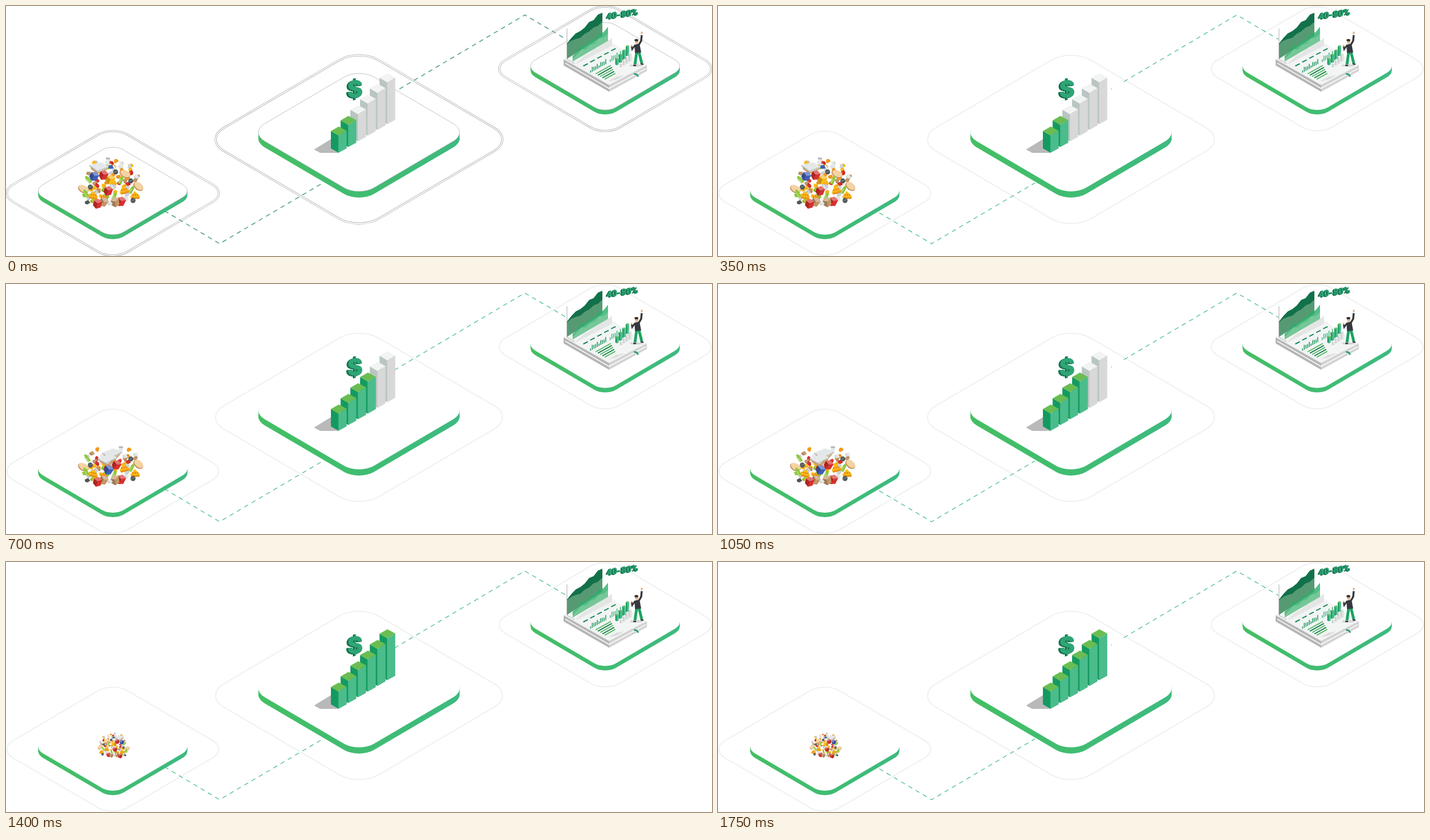
These frames come from a looping animation (1256x446 px, 2100 ms). An HTML page with a canvas:

```html
<!DOCTYPE html>
<html lang="en">
<head>
<meta charset="utf-8">
<style>
  html, body { margin: 0; width: 100%; height: 100%; overflow: hidden; background: #fff; }
  canvas { display: block; }
</style>
</head>
<body>
<canvas id="stage" width="1256" height="446"></canvas>
<script>
const ctx = document.getElementById('stage').getContext('2d');
const STEP = 350, STEPS = 6;

function trace(pts) {
  ctx.beginPath();
  for (let i = 0; i < pts.length; i += 2) ctx.lineTo(pts[i], pts[i + 1]);
}
function poly(color, ...pts) {
  trace(pts);
  ctx.fillStyle = color;
  ctx.fill();
}
function line(color, width, ...pts) {
  trace(pts);
  ctx.strokeStyle = color;
  ctx.lineWidth = width;
  ctx.stroke();
}
function oval(color, x, y, rx, ry = rx) {
  ctx.beginPath();
  ctx.ellipse(x, y, rx, ry, 0, 0, 7);
  ctx.fillStyle = color;
  ctx.fill();
}
function placed(x, y, draw, turn = 0) {
  ctx.save();
  ctx.translate(x, y);
  ctx.rotate(turn);
  draw();
  ctx.restore();
}

// Plates
function diamond(x, y, halfWidth, r) {
  const a = (halfWidth + 0.414 * r) / Math.SQRT2;
  ctx.beginPath();
  ctx.save();
  ctx.translate(x, y);
  ctx.scale(1, 0.588);
  ctx.rotate(Math.PI / 4);
  ctx.roundRect(-a, -a, 2 * a, 2 * a, r);
  ctx.restore();
}
function ring(x, y, w, r, bold) {
  diamond(x, y, w, r);
  ctx.strokeStyle = bold ? '#a9a9a9' : '#eff1f1';
  ctx.lineWidth = bold ? 3.4 : 2;
  ctx.stroke();
  if (!bold) return;
  ctx.strokeStyle = '#fff';
  ctx.lineWidth = 1.9;
  ctx.stroke();
}
function plate(x, y, w, r, rim, bold) {
  const g = ctx.createLinearGradient(x - w, 0, x + w, 0);
  g.addColorStop(0, '#44bf63');
  g.addColorStop(1, '#3dba80');
  ctx.fillStyle = g;
  for (let d = 1; d <= rim; d++) {
    diamond(x, y + d, w, r);
    ctx.fill();
  }
  diamond(x, y, w, r);
  ctx.fillStyle = '#fff';
  ctx.fill();
  if (bold) {
    ctx.strokeStyle = '#b4b4b4';
    ctx.lineWidth = 0.8;
    ctx.stroke();
  }
}
function dashes(bold, ...pts) {
  ctx.setLineDash([8, 7]);
  line(bold ? '#55a388' : '#3fb984', bold ? 1.6 : 1.2, ...pts);
  ctx.setLineDash([]);
}

// Growth bars
const GREY = ['#f1f4f3', '#b9c5c0', '#d7d8d7'];
const GREEN = ['#6abd52', '#149a60', '#4bbc8c'];
function bar(x, top, foot, [lid, left, right], w = 14) {
  const h = w * 0.58;
  poly(left, x, top, x + w, top + h, x + w, foot, x, foot - h);
  poly(right, x + w - 0.6, top + h, x + 2 * w, top - 0.5, x + 2 * w, foot - h, x + w - 0.6, foot);
  poly(lid, x, top, x + w, top - h, x + 2 * w, top - 0.5, x + w - 0.6, top + h);
}
function extruded(text, font, x, y, slope, depth) {
  ctx.save();
  ctx.transform(1, slope, 0, 1, x, y);
  ctx.font = font;
  ctx.fillStyle = '#14714d';
  for (let d = depth; d > 0; d -= 0.5) ctx.fillText(text, -d, d * 0.35);
  ctx.fillStyle = '#2fa576';
  ctx.fillText(text, 0, 0);
  ctx.restore();
}
function growth(filled) {
  poly('#b9b9b9', 548, 256, 579, 237, 592, 262, 559, 262);
  for (let i = 5; i >= 0; i--)
    bar(578 + 17.3 * i, 223 - 19 * i, 262 - 10.2 * i, i < filled ? GREEN : GREY);
  extruded('$', '900 42px Inter, sans-serif', 607, 164, -0.06, 3);
}

// Book with charts
function area(color, x0, y0, x1, y1, heights) {
  const n = heights.length - 1;
  const tops = heights.flatMap((h, i) => [x0 + (x1 - x0) * i / n, y0 + (y1 - y0) * i / n - h]);
  poly(color, x0, y0, ...tops, x1, y1);
}
function book() {
  poly('#b5b5b5', 992, 95, 1073, 141, 1073, 153, 992, 106);
  poly('#d2d2d2', 1073, 141, 1140, 106, 1140, 116, 1073, 153);
  line('#f4f4f4', 2, 995, 102, 1073, 147, 1138, 112);
  poly('#f3f4f4', 992, 95, 1066, 57, 1140, 106, 1073, 141);
  line('#d5d5d5', 1, 992, 95, 1073, 141, 1140, 106);
  line('#c4c4c4', 1.4, 998, 40, 998, 95, 1012, 103);

  area('#12714a', 998, 94, 1061, 53, [27, 32, 35, 34, 35, 40, 38, 43, 41]);
  area('#569a73', 998, 94, 1061, 53, [26, 27, 25, 22, 24, 23, 25, 23, 25]);
  area('#e3e6e4', 1014, 104, 1078, 71, [2, 5, 8, 7, 11, 10, 13, 12, 14]);
  area('#2eae6ed0', 1008, 99, 1071, 62, [10, 13, 19, 15, 18, 17, 22, 20, 25]);
  area('#8ccfa3a0', 1008, 99, 1071, 62, [5, 8, 12, 8, 11, 9, 13, 10, 12]);

  for (let i = 0; i < 5; i++) {
    const x = 1027 + 12.4 * i, y = 107 - 6.8 * i;
    line('#168a58', 2, x, y, x + 8, y - 4);
  }
  for (let i = 0; i < 10; i++) {
    const h = 4 + 5 * Math.abs(Math.sin(i * 1.9));
    line('#239b64', 1.6, 1040 + 3 * i, 119 - 1.7 * i, 1040 + 3 * i, 119 - 1.7 * i - h);
    if (i < 7) line('#4bbc8c', 1.6, 1075 + 3 * i, 100 - 1.7 * i, 1075 + 3 * i, 99 - 1.7 * i - h);
  }
  for (let i = 0; i < 5; i++) {
    const x = 1049 + 4 * i, y = 121 + 2.4 * i, w = 27 - 2 * i;
    line(i % 2 ? '#147c50' : '#52bb62', 1.8, x, y, x + w, y - w * 0.55);
  }
  for (let i = 0; i < 3; i++)
    line('#c3c7c5', 0.8, 1073 + 5 * i, 134 - i, 1088 + 5 * i, 126 - i);
  for (let i = 3; i >= 0; i--) {
    bar(1084 + 6.2 * i, 94 - 7.5 * i, 106 - 4 * i, GREEN, 3);
    bar(1092 + 5.2 * i, 102 - 6 * i, 110 - 3.5 * i, ['#fff', '#c9cdcb', '#e2e4e3'], 2.8);
  }
  line('#1c9c65', 2.6, 1117, 121, 1122, 122, 1125, 126);
  extruded('40-80%', '900 16px Roboto, sans-serif', 1069, 24, -0.15, 2.5);
}
function person() {
  oval('#d3d5d4', 1121, 106, 12, 2);
  line('#1da363', 5, 1122, 82, 1119, 104);
  line('#1da363', 5, 1126, 82, 1131, 102);
  line('#30343a', 2.5, 1116, 106, 1121, 106);
  line('#30343a', 2.5, 1129, 103, 1134, 104);
  poly('#363940', 1118, 69, 1127, 67, 1130, 83, 1119, 84);
  line('#363940', 3.5, 1126, 69, 1130, 62, 1131, 52);
  line('#363940', 3, 1119, 70, 1114, 77, 1113, 72);
  oval('#e4b58f', 1131, 48, 1.8, 2.6);
  oval('#e4b58f', 1113, 71, 1.8);
  oval('#e4b58f', 1122, 63.5, 3, 4);
  oval('#3d3430', 1121.5, 61, 3.4, 2.2);
}

// Heap of leftovers
const kinds = {
  box(c) {
    poly(c, 0, -8, 8, -4, 6, 7, -2, 10, -8, 4, -7, -4);
    poly('#0003', -7, -4, 0, 0, -2, 10, -8, 4);
    poly('#fff5', 0, -8, 8, -4, 0, 0, -7, -4);
  },
  bread(c) {
    oval('#c18a52', 0, 1, 10, 6.5);
    oval(c, 0, 0, 9.2, 5.6);
  },
  bottle(c) {
    ctx.fillStyle = c;
    ctx.fillRect(-3, -3, 6, 11);
    poly(c, -3, -2, -1.3, -7, 1.3, -7, 3, -2);
    poly('#fff6', -2, -1, -0.5, -1, -0.5, 7, -2, 7);
  },
  pizza(c) {
    poly(c, -8, 3, 0, -7, 9, 2, 8, 7, -6, 7);
    poly('#e59117', -7, 4, 9, 4, 8, 7, -6, 7);
    for (const x of [-3, 1, 5]) oval('#e2711f', x, x % 2 ? 0 : 2, 1.3);
  },
  ball(c) {
    oval(c, 0, 0, 4.5);
    line('#8c9692', 1, -3, 1, 3, -2);
  },
  tray(c) {
    poly('#c99d6c', -15, 1, 0, 9, 17, 0, 12, 6, 0, 13, -13, 6);
    poly('#b5b8ba', -17, -1, -2, 7, 18, -3, 18, -1, -2, 9, -17, 1);
    poly(c, -17, -1, 3, -9, 18, -3, -2, 7);
  },
  cup(c) {
    poly(c, -4, -5, 4, -5, 3, 6, -3, 6);
    oval('#aeb4b6', 0, -5, 4, 1.6);
  },
  slice(c) {
    ctx.beginPath();
    ctx.arc(0, 0, 4, 0, 4.5);
    ctx.fillStyle = c;
    ctx.fill();
  },
  scrap(c) {
    poly(c, -5, -1, 1, -4, 5, 1, 0, 4, -4, 3);
    poly('#0001', -5, -1, 0, 1, 0, 4, -4, 3);
  }
};
const RED = '#d6302d', BLUE = '#405fb4', LIME = '#8fc93f', GOLD = '#fcb918',
  BREAD = '#f4d3a2', WHITE = '#e5e8e9', DARK = '#515a5b', TAN = '#c4976a', ORANGE = '#f39a20';

const base = [
  ['bread', 138, 326, 0.5, BREAD], ['bread', 236, 321, 0.7, BREAD],
  ['ball', 150, 323, 0, DARK], ['ball', 222, 312, 0, DARK],
  ['pizza', 155, 337, 0.2, GOLD], ['pizza', 209, 328, -0.3, GOLD], ['pizza', 229, 337, 0, GOLD],
  ['bottle', 142, 334, -0.5, LIME], ['bottle', 193, 339, 0.4, LIME], ['bottle', 224, 327, 0.5, LIME],
  ['box', 182, 329, 0.2, RED], ['box', 163, 352, 0.1, RED], ['box', 205, 348, 0.3, RED],
  ['box', 174, 349, 0.5, TAN], ['box', 194, 349, -0.3, TAN],
  ['scrap', 185, 352, 0, WHITE], ['ball', 226, 347, 0, DARK], ['scrap', 145, 350, 0, DARK]
];
const peak = [
  ['cup', 181, 277, 0.1, WHITE], ['slice', 196, 277, 2, ORANGE],
  ['tray', 165, 287, 0.15, WHITE], ['box', 157, 303, 0.4, BLUE],
  ['bottle', 146, 309, -0.7, LIME], ['scrap', 187, 287, 0.4, BLUE],
  ['box', 174, 301, 0.3, RED], ['bread', 212, 299, 0.5, BREAD],
  ['bottle', 205, 310, 0.4, LIME], ['ball', 195, 296, 0, DARK],
  ['box', 186, 309, 0.2, GOLD], ['scrap', 232, 304, 0, WHITE], ['scrap', 205, 286, 0.4, WHITE]
];
const low = [
  ['cup', 204, 296, 0.1, WHITE], ['slice', 219, 296, 2, ORANGE],
  ['slice', 163, 295, 1, ORANGE], ['scrap', 153, 302, 0, TAN],
  ['scrap', 231, 304, 0.3, WHITE], ['bottle', 144, 310, -0.6, LIME],
  ['scrap', 212, 307, 0.3, WHITE], ['tray', 180, 312, 0, WHITE], ['tray', 188, 302, 0, WHITE],
  ['box', 197, 322, 0.4, RED], ['box', 183, 331, 0.4, BLUE]
];

let seed = 11;
function rand() {
  seed = seed * 16807 % 2147483647;
  return seed / 2147483647;
}
const pick = list => list[Math.floor(rand() * list.length)];
const filler = Array.from({ length: 88 }, () => {
  const y = 279 + 74 * rand();
  const reach = 52 * Math.sqrt(1 - ((y - 325) / (y < 325 ? 56 : 36)) ** 2);
  const x = 187 + (2 * rand() - 1) * reach;
  return [pick(['scrap', 'scrap', 'slice', 'scrap']), x, y, 6 * rand(),
    pick([WHITE, WHITE, '#cdd2d4', GOLD, GOLD, ORANGE, LIME, TAN, RED])];
});
const stack = (...lists) => lists.flatMap(l => [...l].sort((a, b) => a[2] - b[2]));
const fullHeap = stack(filler, [...base, ...peak]);
const lowHeap = stack(filler.filter(f => f[2] > 306), base, low);

function heap(items) {
  for (const [kind, x, y, turn, color] of items) placed(x, y, () => kinds[kind](color), turn);
}

function draw(step) {
  const bold = step === 0, odd = step % 2 === 1, level = Math.floor(step / 2);
  ctx.fillStyle = '#fff';
  ctx.fillRect(0, 0, 1256, 446);

  ring(190, 334, 188.5, 37, bold);
  ring(628, 238, 255, 50, bold);
  ring(1066, 112, 188.5, 37, bold);
  if (odd) dashes(bold, 287, 369, 380, 424, 564, 315.5);
  else dashes(bold, 282, 365.5, 380, 424, 570, 312);

  plate(190, 330, 132.5, 27, 8, bold);
  plate(628, 225.5, 179, 37, 11, bold);
  plate(1066, 107.5, 132.5, 27, 8, bold);
  if (odd) {
    oval('#3fb984', 700, 148, 0.8);
    dashes(bold, 722, 135, 923, 16, 997, 59.5);
  } else {
    dashes(bold, ...(bold ? [700, 148] : [691, 153.5]), 923, 16, 997, 59.5);
  }

  if (level < 2) heap(level ? lowHeap : fullHeap);
  else placed(191, 350, () => {
    ctx.scale(-0.49, 0.5);
    ctx.translate(-187, -361);
    heap(fullHeap);
  });
  growth(2 + 2 * level);
  book();
  person();
}

function tick() {
  draw(Math.floor(performance.now() / STEP) % STEPS);
  requestAnimationFrame(tick);
}
tick();
</script>
</body>
</html>
```
